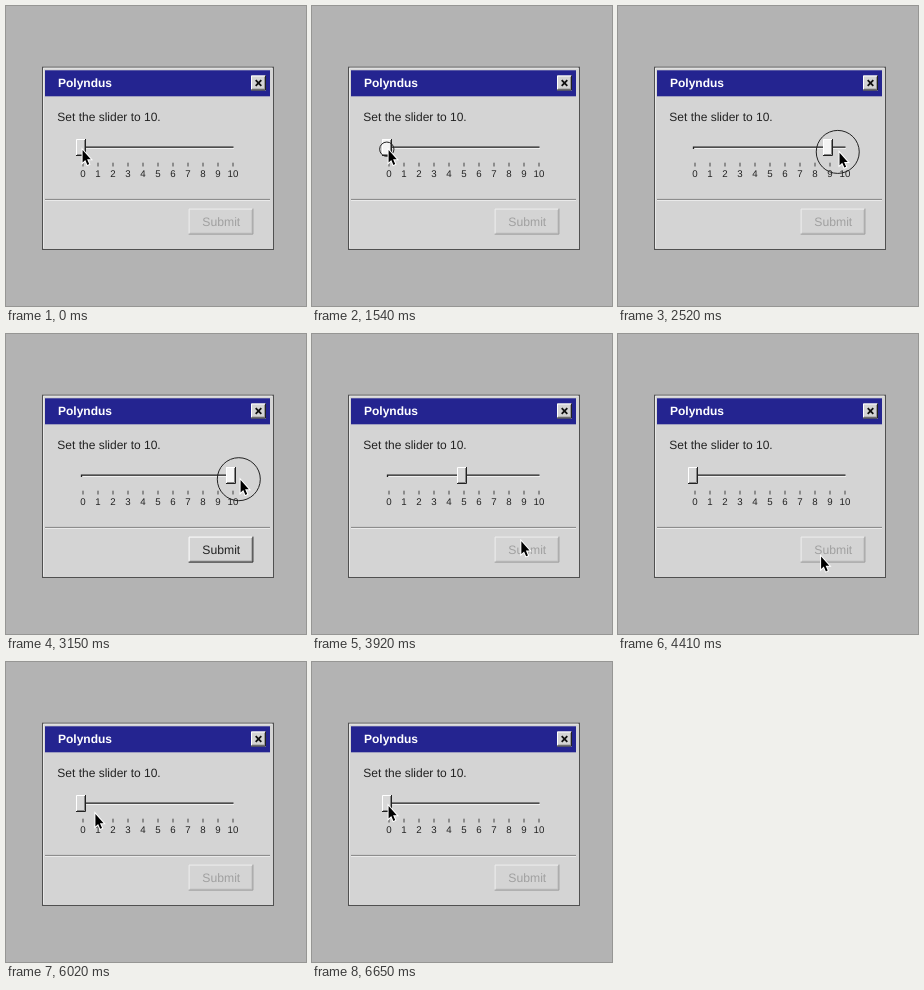
Animation of 300 by 300 pixels, one loop 6.79 s. Source, as an HTML page:

```html
<!DOCTYPE html>
<html lang="en">
<head>
<meta charset="utf-8">
<title>Slider dialog</title>
<style>
  html, body { margin: 0; width: 100%; height: 100%; overflow: hidden; background: #b3b3b3; }
  svg { display: block; width: 100vw; height: 100vh; }
  text {
    font-family: "Liberation Sans", Arial, sans-serif; font-size: 12px; fill: #222;
    text-rendering: geometricPrecision;
  }
  .title { font-weight: bold; fill: #fff; }
  .scale text { font-size: 9.7px; text-anchor: middle; }
  path { fill: none; }
</style>
</head>
<body>
<svg viewBox="0 0 300 300">
  <rect width="300" height="300" fill="#b3b3b3"/>
  <rect x="36.5" y="61.2" width="231" height="182.3" fill="#d4d4d4" stroke="#505050"/>
  <path d="M37.5 242V62.2H266" stroke="#e8e8e8"/>
  <rect x="39" y="64.3" width="225" height="26" fill="#242490"/>
  <text class="title" x="52" y="81">Polyndus</text>
  <g id="close"></g>
  <path d="M249.7 74.2l5.6 5.6m0-5.6l-5.6 5.6" stroke="#111" stroke-width="1.8"/>
  <text x="51.3" y="115">Set the slider to 10.</text>
  <path d="M75 142.5H228" stroke="#f0f0f0"/>
  <path d="M75.5 143V141.2H227.5" stroke="#222" stroke-width="1.3"/>
  <g class="scale" id="scale"></g>
  <path d="M39 193.4H264" stroke="#777"/>
  <path d="M39 194.4H264" stroke="#eee"/>
  <g id="button"></g>
  <text id="label" x="215.3" y="220" text-anchor="middle" style="font-size:12.2px">Submit</text>
  <g id="thumb"></g>
  <circle id="ring" fill="none" stroke="#222"/>
  <path id="cursor" d="M0.6 1V13.6L3.3 11.1L5.4 15.9L7.2 15.1L5.1 10.2H8.8Z"
        style="fill:#000" stroke="#fff" stroke-width="2" paint-order="stroke"/>
</svg>
<script>
const LOOP = 6790, STEP = 70;
const PRESS = 1470, RELEASE = 3570, RETURN = 5460;
const HOME = [76, 143], DRAGGED = [234, 145], SUBMIT = [202.5, 221.5];

const el = id => document.getElementById(id);
const clamp = (v, lo = 0, hi = 1) => Math.min(hi, Math.max(lo, v));
const progress = (t, start, length) => clamp((t - start) / length);
const easeOut = (p, power = 3) => 1 - (1 - p) ** power;
const mix = (a, b, p) => a.map((v, i) => v + (b[i] - v) * p);

// Raised box with light top-left and dark bottom-right edges.
function bevel(x, y, w, h, fill, light, dark, shade) {
  const r = x + w - 0.5, b = y + h - 0.5;
  return `<rect x="${x}" y="${y}" width="${w}" height="${h}" fill="${fill}"/>
    <path d="M${x + 1} ${b - 1}H${r - 1}V${y + 1}" stroke="${shade}"/>
    <path d="M${x + 0.5} ${b}V${y + 0.5}H${r}" stroke="${light}"/>
    <path d="M${x} ${b}H${r}V${y}" stroke="${dark}"/>`;
}

el('close').innerHTML = bevel(245, 69.5, 15, 15, '#d4d4d4', '#fff', '#222', '#999');
el('scale').innerHTML = Array.from({ length: 11 }, (_, i) => {
  const x = 77 + 15 * i;
  return `<path d="M${x} 156.7V160.5" stroke="#444"/><text x="${x}" y="171">${i}</text>`;
}).join('');

function cursorAt(t) {
  if (t >= RETURN) return mix(SUBMIT, HOME, easeOut(progress(t, RETURN, 1190), 3.6));
  if (t >= RELEASE) return mix(DRAGGED, SUBMIT, easeOut(progress(t, RELEASE, 840)));
  const p = easeOut(progress(t, 1758, 1350));
  const dip = 1.3 * Math.sin(Math.PI * p ** 8);
  return [mix(HOME, DRAGGED, p)[0], mix(HOME, DRAGGED, p ** 4)[1] + dip];
}

function draw(t) {
  const [x, y] = cursorAt(t);
  const held = t > PRESS && t <= RELEASE;
  const value = t > RELEASE
    ? clamp(10 - Math.floor((t - RELEASE) / STEP), 0, 10)
    : clamp(Math.floor((x - 78) / 15), 0, 10);
  const enabled = value === 10;

  el('cursor').setAttribute('transform', `translate(${x} ${y})`);
  el('thumb').innerHTML = bevel(70 + 15 * value, 133, 10, 17,
    held ? '#f4f4f4' : '#d8d8d8', '#fff', '#222', '#888');
  el('button').innerHTML = enabled
    ? bevel(182.6, 202.6, 64.8, 26, '#d4d4d4', '#fff', '#222', '#999')
    : bevel(182.6, 202.6, 64.8, 26, '#d4d4d4', '#eee', '#999', '#c0c0c0');
  el('label').style.fill = enabled ? '#222' : '#a0a0a0';

  const open = progress(t, PRESS, 3 * STEP) - progress(t, RELEASE, 3 * STEP);
  const ring = el('ring');
  ring.setAttribute('cx', x - 1.2);
  ring.setAttribute('cy', y + 0.2);
  ring.setAttribute('r', 21.5 * open);
  ring.style.display = open > 0 ? '' : 'none';
}

const start = performance.now();
function tick() {
  const t = (performance.now() - start) % LOOP;
  draw(Math.floor(t / STEP) * STEP);
  requestAnimationFrame(tick);
}
tick();
</script>
</body>
</html>
```
